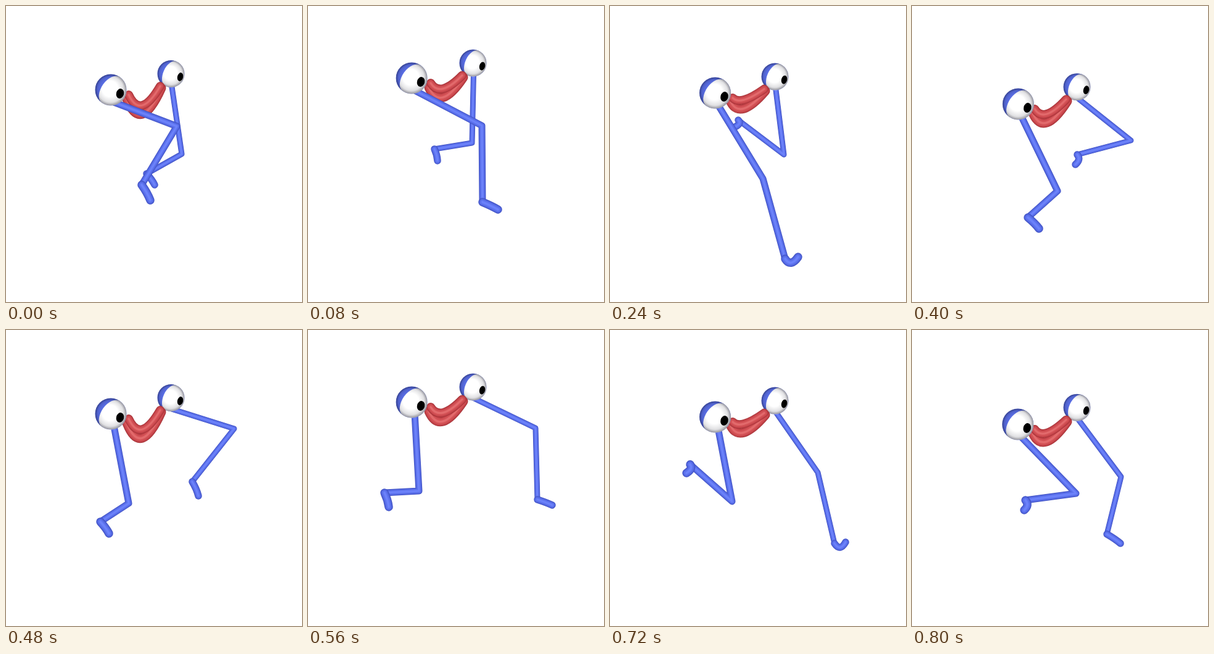
An HTML page with a canvas that plays this animation: 480 px wide and 480 px high, repeating every 880 ms.

```html
<!DOCTYPE html>
<html>
<head>
<meta charset="utf-8">
<style>
  html, body { margin: 0; height: 100%; overflow: hidden; background: #fff; }
  canvas { display: block; }
</style>
</head>
<body>
<canvas id="stage" width="480" height="480"></canvas>
<script>
const ctx = document.getElementById('stage').getContext('2d');
const STEP = 80;

// Layers of a shaded tube: colour and share of the full width.
const BLUE = [['#4051c2', 1], ['#5064dc', .86], ['#5d73ee', .6], ['#6c82fa', .28]];
const RED = [['#a93439', 1], ['#c4444a', .84], ['#d35155', .58], ['#e26a6c', .24]];

// Each stride pose: knee, ankle and toe positions.
const NEAR = [
  [277,195, 220,290, 234,315], [282,194, 283,318, 308,330], [267,243, 312,390, 329,376],
  [248,280, 284,410, 305,407], [245,294, 233,389, 257,407], [236,300, 188,343, 206,361],
  [199,281, 153,311, 167,330], [180,261, 124,264, 131,287], [169,255, 111,241, 112,259],
  [198,278, 130,218, 124,232], [266,265, 184,276, 182,292]
];
const FAR = [
  [285,240, 228,272, 241,290], [266,222, 205,232, 210,251], [257,221, 190,210, 190,229],
  [282,241, 208,185, 203,196], [348,228, 259,238, 257,253], [355,218, 268,241, 265,257],
  [370,160, 302,246, 312,269], [369,159, 372,275, 396,284], [356,199, 392,327, 409,312],
  [337,231, 364,346, 382,344], [339,238, 316,331, 338,346]
];
// The body bounces twice per stride.
const BOUNCE = [0, -19, -9, 5, 17, 23];
const SAG = [25, 17, 9, 11, 14, 16];

function tube(path, width, layers) {
  ctx.lineCap = ctx.lineJoin = 'round';
  for (const [color, share] of layers) {
    ctx.strokeStyle = color;
    ctx.lineWidth = width * share;
    ctx.stroke(path);
  }
}

function leg(hipX, hipY, [kx, ky, ax, ay, tx, ty], width, footWidth) {
  const limb = new Path2D();
  limb.moveTo(hipX, hipY);
  limb.lineTo(kx, ky);
  limb.lineTo(ax, ay);
  const foot = new Path2D();
  foot.moveTo(ax, ay);
  if (ty < ay) foot.quadraticCurveTo(ax + 9, ay + 14, tx, ty);
  else foot.quadraticCurveTo((ax + tx) / 2 + (tx < ax ? 8 : 2), (ay + ty) / 2, tx, ty);
  tube(limb, width, BLUE);
  tube(foot, footWidth, BLUE);
}

function eye(x, y, r, tilt, depth, pupil) {
  ctx.save();
  ctx.translate(x, y);
  ctx.beginPath();
  ctx.arc(0, 0, r, 0, 7);
  ctx.fillStyle = '#5b70e8';
  ctx.fill();
  ctx.clip();

  ctx.save();
  ctx.rotate(tilt);
  ctx.beginPath();
  ctx.arc(0, 0, r + 1, -Math.PI / 2, Math.PI / 2);
  ctx.ellipse(0, 0, r * depth, r, 0, Math.PI / 2, Math.PI * 1.5);
  ctx.fillStyle = '#fff';
  ctx.fill();
  ctx.restore();

  const shade = ctx.createRadialGradient(-r * .1, -r * .14, 0, 0, 0, r);
  shade.addColorStop(.5, 'rgba(0,0,20,0)');
  shade.addColorStop(.82, 'rgba(0,0,20,.12)');
  shade.addColorStop(1, 'rgba(0,0,20,.42)');
  ctx.fillStyle = shade;
  ctx.fillRect(-r, -r, 2 * r, 2 * r);

  const [px, py, rx, ry] = pupil;
  ctx.beginPath();
  ctx.ellipse(px, py, rx, ry, .25, 0, 7);
  ctx.fillStyle = '#000';
  ctx.fill();
  ctx.restore();
}

function lip(x0, y0, xm, ym, x1, y1, width) {
  const path = new Path2D();
  path.moveTo(x0, y0);
  path.quadraticCurveTo(2 * xm - (x0 + x1) / 2, 2 * ym - (y0 + y1) / 2, x1, y1);
  tube(path, width, RED);
}

function draw(step) {
  const beat = step % 6;
  const lift = BOUNCE[beat];
  const sag = SAG[beat];
  const nearX = 170 + lift * .1, nearY = 136 + lift;
  const farX = 267.5, farY = 110 + lift * .92;
  const midX = 215 + sag * .25;

  ctx.fillStyle = '#fff';
  ctx.fillRect(0, 0, 480, 480);

  leg(farX + 1, farY + 18, FAR[step], 9, 11.5);
  eye(farX, farY, 22, .42, .57, [15, 5, 4.6, 7]);
  lip(196, nearY + 15, midX, nearY + sag + 14, 252, farY + 23, 15);
  lip(199, nearY + 8, midX, nearY + sag, 250, farY + 20, 14);
  leg(nearX + 5, nearY + 20, NEAR[step], 11, 13.5);
  eye(nearX, nearY, 25.5, .62, .6, [15, 6, 6.2, 8]);
}

function tick() {
  draw(Math.floor(performance.now() / STEP) % NEAR.length);
  requestAnimationFrame(tick);
}
tick();
</script>
</body>
</html>
```
